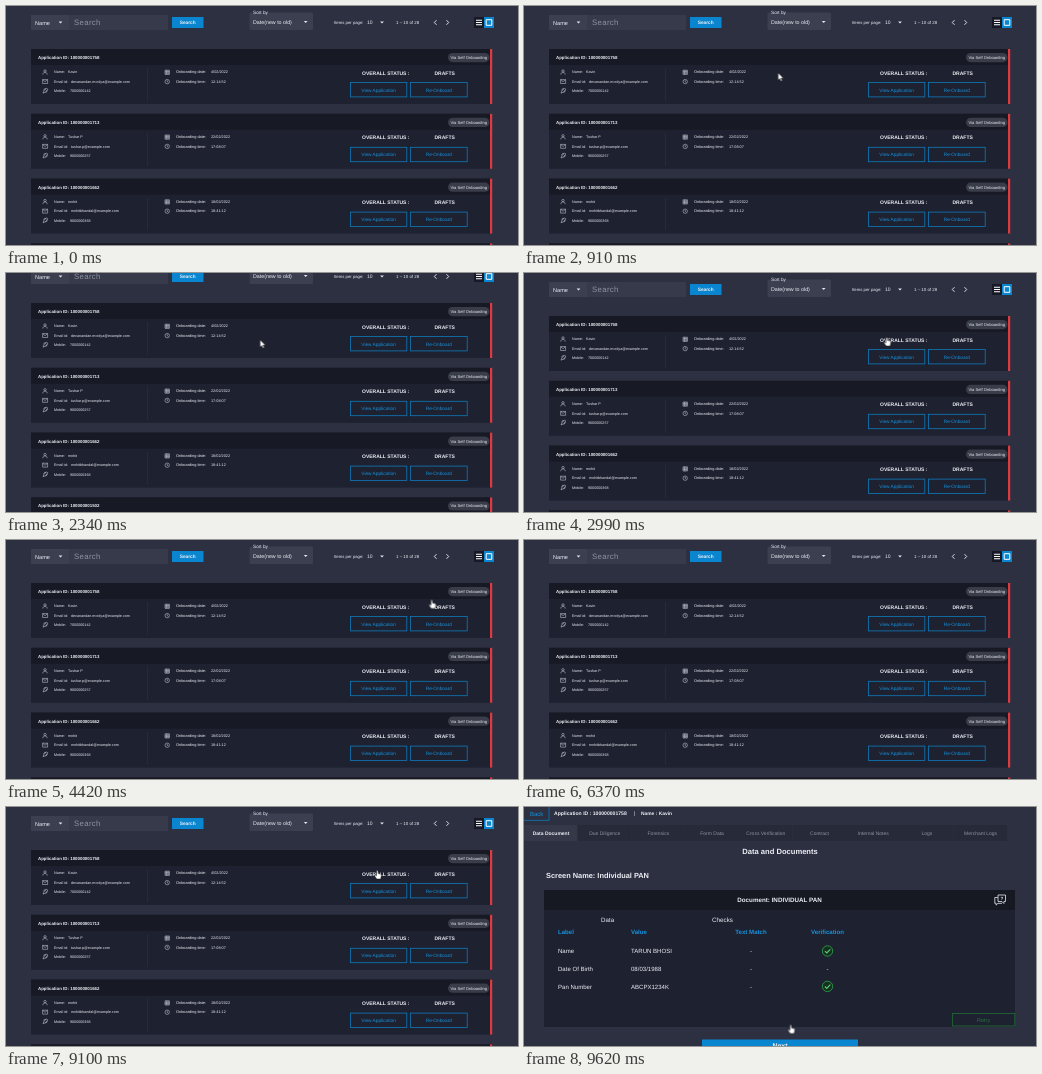
Recreate the animation shown at these times as an HTML page. Size 512 px wide and 239 px high, loop 9.75 s.

```html
<!DOCTYPE html>
<html lang="en">
<head>
<meta charset="utf-8">
<title>Onboarding applications</title>
<style>
  html, body { margin: 0; width: 100%; height: 100%; overflow: hidden; background: #2c3041; }
  svg { display: block; width: 100%; height: 100%; }
  text { font-family: "Liberation Sans", Arial, sans-serif; fill: #eceef4; text-rendering: geometricPrecision; white-space: pre; }
  .b { font-weight: 700; }
  .m { text-anchor: middle; }
  .blue { fill: #1593de; }
  .dim { fill: #8f93a1; }
  .ico { fill: none; stroke: #c9ccd6; stroke-width: .55; }
  .btn { fill: none; stroke: #0e7abb; stroke-width: .8; }

  #list, #scroll, #detail, #focus, #cursor, #arrow, #hand { animation: 9750ms step-end infinite; }
  #list { animation-name: list; }
  #detail { animation-name: detail; }
  #scroll { animation-name: scroll; }
  #focus { animation-name: focus; }
  #cursor { animation-name: cursor; }
  #arrow { animation-name: arrow; }
  #hand { animation-name: hand; }

  @keyframes list { 0% { visibility: visible } 94.666%, 100% { visibility: hidden } }
  @keyframes detail { 0% { visibility: hidden } 94.666%, 100% { visibility: visible } }
  @keyframes focus { 0% { opacity: 0 } 84% { opacity: 1 } 86.666%, 100% { opacity: 0 } }
  @keyframes scroll {
    0%, 18.666% { transform: none; animation-timing-function: steps(1, jump-both) }
    20%, 24% { transform: translateY(-26px); animation-timing-function: steps(1, jump-both) }
    25.333%, 100% { transform: none }
  }
  @keyframes cursor {
    0%, 4% { transform: translate(250px, 250px); animation-timing-function: steps(4, jump-both) }
    9.333%, 25.333% { transform: translate(256.5px, 71px); animation-timing-function: steps(4, jump-both) }
    30.666%, 38.666% { transform: translate(363.5px, 69px); animation-timing-function: steps(5, jump-both) }
    45.333% { transform: translate(426.5px, 64.5px); animation-timing-function: steps(2) }
    48%, 49.333% { transform: translate(428px, 67px); animation-timing-function: steps(2, jump-both) }
    52% { transform: translate(530px, 60px); animation-timing-function: step-end }
    84% { transform: translate(376.5px, 66.5px); animation-timing-function: steps(7) }
    93.333%, 94.666% { transform: translate(372px, 68px); animation-timing-function: steps(3, jump-both) }
    98.666%, 100% { transform: translate(267.5px, 222.5px) }
  }
  @keyframes arrow {
    0% { opacity: 1 } 29.333% { opacity: 0 } 49.333% { opacity: 1 }
    84% { opacity: 0 } 94.666% { opacity: 1 } 97.333%, 100% { opacity: 0 }
  }
  @keyframes hand {
    0% { opacity: 0 } 29.333% { opacity: 1 } 49.333% { opacity: 0 }
    84% { opacity: 1 } 94.666% { opacity: 0 } 97.333%, 100% { opacity: 1 }
  }
</style>
</head>
<body>
<svg viewBox="0 0 512 239" preserveAspectRatio="none">
  <defs>
    <g id="cardIcons" class="ico">
      <circle cx="39" cy="22" r="1.2"/>
      <path d="M36.8 25.6c0-3 4.4-3 4.4 0"/>
      <path d="M36.6 30.6h5v3.9h-5zl2.5 2.1 2.5-2.1"/>
      <path d="M37 44.2l1.2-3 2.6-1.9 1 .9-1.8 2.6zM37.6 41.2l1-1.5 1.5.2M39.6 43.4l1.4-.8.1-1.4"/>
      <path d="M159 21.2h4.4v4.2H159zM159 22.6h4.4M159 24h4.4M160.5 21.2v4.2M162 21.2v4.2"/>
      <circle cx="161.2" cy="32.6" r="2.2"/>
      <path d="M161.2 31.2v1.5l1 .6"/>
    </g>
    <g id="tick">
      <circle r="5.2" fill="#14301f" stroke="#2f9a4a" stroke-width=".9"/>
      <path d="M-2.6 .1L-.7 2 2.8-1.7" fill="none" stroke="#5fd07a" stroke-width="1.1"/>
    </g>
  </defs>

  <rect width="512" height="239" fill="#2c3041"/>

  <g id="list">
    <g id="scroll">
      <g id="bar"></g>
      <g id="focus" fill="none" stroke="#f2f3f7" stroke-width=".8">
        <path d="M246 6.5h-1a1.5 1.5 0 0 0-1.5 1.5v14.5a1.5 1.5 0 0 0 1.5 1.5h60.5a1.5 1.5 0 0 0 1.5-1.5V8a1.5 1.5 0 0 0-1.5-1.5H264"/>
      </g>
      <g id="cards"></g>
    </g>
  </g>

  <g id="detail"></g>

  <g id="cursor">
    <path id="arrow" d="M-2.4-4.2v7.4l1.7-1.5 1.2 2.6 1.3-.6-1.2-2.5h2.3z" fill="#fff" stroke="#111" stroke-width=".5"/>
    <path id="hand" d="M-1.4-4.2c.8-.6 1.4-.1 1.4.7v2l2.4.5c.8.2 1 .7.9 1.5L2.7 4h-4L-3.3 1c-.4-.8.4-1.2 1-.7l.7.6z" fill="#fff" stroke="#222" stroke-width=".5"/>
  </g>
</svg>

<script>
  const $ = id => document.getElementById(id);
  // y is the middle of the capitals
  const text = (x, y, size, str, cls = "") =>
    `<text x="${x}" y="${y + size * .36}" font-size="${size}" class="${cls}">${str}</text>`;
  const rect = (x, y, w, h, fill, more = "") =>
    `<rect x="${x}" y="${y}" width="${w}" height="${h}" fill="${fill}" ${more}/>`;
  const outline = (x, y, w, h) => `<rect x="${x}" y="${y}" width="${w}" height="${h}" class="btn"/>`;
  const line = (d, color, w) => `<path d="${d}" fill="none" stroke="${color}" stroke-width="${w}"/>`;
  const caret = (x, y) => `<path d="M${x - 1.9} ${y - .9}h3.8l-1.9 2z" fill="#e4e6ee"/>`;

  $("bar").innerHTML =
    rect(25, 9, 38, 15, "#3b3f50") + rect(63, 9, 99, 15, "#363a4b") +
    text(29, 16.5, 5.6, "Name") + caret(54.5, 16.3) +
    `<g letter-spacing=".35">${text(68, 16.5, 7.8, "Search", "dim")}</g>` +
    rect(166, 11, 31.5, 11, "#0a85d0") + text(181.7, 16.5, 4.8, "Search", "b m") +
    rect(243.5, 6.5, 63.5, 17.5, "#3b3f50", 'rx="1.5"') +
    text(247, 6.2, 4.7, "Sort by") + text(247, 16.3, 5.3, "Date(new to old)") + caret(299.7, 15.8) +
    text(328, 16.3, 4.25, "Items per page:") + text(361, 16.3, 5, "10") + caret(376, 16.3) +
    text(390, 16.5, 4.4, "1 – 10 of 28") +
    line("M430.5 14.2l-2.2 2.3 2.2 2.3M440.5 14.2l2.2 2.3-2.2 2.3", "#f0f1f5", .9) +
    rect(468, 11, 10, 11, "#171a26") + rect(478, 11, 10, 11, "#0a85d0") +
    line("M470 14.2h6M470 16.5h6M470 18.8h6", "#fff", 1.1) +
    line("M480.2 13.7h5.6v5.6h-5.6z", "#fff", 1);

  const people = [
    ["1758", "Kavin", "devanandan.moolya@example.com", "7000000142", "4/02/2022", "12:14:52"],
    ["1713", "Tushar P", "tushar.p@example.com", "9000000257", "22/02/2022", "17:08:07"],
    ["1662", "mohit", "mohitbhandal@example.com", "9000000368", "18/02/2022", "18:41:12"],
    ["1502", "DemoFlowSampleUser", "demoflow@example.com", "9000000471", "4/02/2022", "11:20:36"]
  ];

  const card = ([id, name, mail, phone, date, time], i) =>
    `<g transform="translate(0 ${43 + i * 64.8})">` +
    rect(25, 0, 461, 55, "#1e2130") + rect(25, 0, 461, 16, "#171924") +
    rect(484, 0, 2.2, 55, "#dc3b40") + rect(141, 19, .6, 33, "#2d3142") +
    text(32, 8.5, 4.4, "Application ID: 10000000" + id, "b") +
    rect(442, 4, 41.5, 9.2, "#393c49", 'rx="4.6"') + text(462.8, 8.6, 4.1, "Via Self Onboarding", "m") +
    '<use href="#cardIcons"/>' +
    text(48, 23, 3.7, "Name:") + text(62, 23, 3.7, name) +
    text(48, 32.5, 3.7, "Email id:") + text(65, 32.5, 3.7, mail) +
    text(48, 42, 3.7, "Mobile:") + text(64, 42, 3.7, phone) +
    text(170, 23, 3.9, "Onboarding date:") + text(205, 23, 3.8, date) +
    text(170, 32.5, 3.9, "Onboarding time:") + text(205, 32.5, 3.8, time) +
    text(356, 23.8, 5, "OVERALL STATUS :", "b") + text(428.5, 23.8, 5, "DRAFTS", "b") +
    outline(344.4, 33.5, 56.4, 14.4) + text(372.6, 40.8, 4.75, "View Application", "blue m") +
    outline(404.4, 33.5, 56.8, 14.4) + text(432.8, 40.8, 4.75, "Re-Onboard", "blue m") +
    "</g>";
  $("cards").innerHTML = people.map(card).join("");

  const tabs = ["Data Document", "Due Diligence", "Forensics", "Form Data", "Cross Verification",
    "Contract", "Internal Notes", "Logs", "Merchant Logs"];
  const tab = (name, i) =>
    rect(i * 53.7, 18, 53.2, 16, i ? "#262a39" : "#343849") +
    text(27 + i * 53.7, 26, 5, name, i ? "dim m" : "b m");

  const rows = [["Name", "TARUN BHOSI", 1], ["Date Of Birth", "08/03/1988", 0], ["Pan Number", "ABCPX1234K", 1]];
  const row = ([label, value, ok], i) => {
    const y = 144 + i * 17.7;
    return text(34, y, 6.05, label) + text(107, y, 6.05, value) + text(227, y, 6.05, "-", "m") +
      (ok ? `<use href="#tick" x="303.5" y="${y}"/>` : text(303.5, y, 6.05, "-", "m"));
  };

  $("detail").innerHTML =
    rect(0, 0, 512, 239, "#2c3041") +
    outline(-.5, -.5, 25.5, 13.8) + text(6, 6.6, 6, "Back", "blue") +
    text(30, 6.6, 5.1, "Application ID : 100000001758", "b") + text(110, 6.6, 5.1, "|") +
    text(117, 6.6, 4.9, "Name : Kavin", "b") +
    tabs.map(tab).join("") +
    text(256, 44.2, 7.6, "Data and Documents", "b m") +
    text(22, 68.2, 7.4, "Screen Name: Individual PAN", "b") +
    rect(20, 83, 471, 137, "#1e2130") + rect(20, 83, 471, 20, "#161822") +
    text(255.5, 93, 6.25, "Document: INDIVIDUAL PAN", "b m") +
    line("M474 88h7.5v6.5h-1.6v2l-2-2H474zM473.8 90.5h-3v5.8h1.3v1.8l1.9-1.8h4", "#e6e8ee", .8) +
    text(477.8, 91.2, 4.6, "?", "b m") +
    text(77, 113, 6.2, "Data") + text(188, 113, 6.3, "Checks") +
    text(34, 125.3, 6.1, "Label", "b blue") + text(107, 125.3, 6.1, "Value", "b blue") +
    text(227, 125.3, 6.1, "Text Match", "b blue m") + text(303.5, 125.3, 6.1, "Verification", "b blue m") +
    rows.map(row).join("") +
    rect(428.4, 206.4, 62.4, 12.6, "none", 'stroke="#1f6d33" stroke-width=".8"') +
    `<g opacity=".6">${text(459.6, 212.6, 5.6, "Retry", "m").replace("<text", '<text style="fill:#2fa04a"')}</g>` +
    rect(178, 232.5, 156, 12, "#0a85d0") + text(256, 238.2, 7, "Next", "b m");
</script>
</body>
</html>
```
